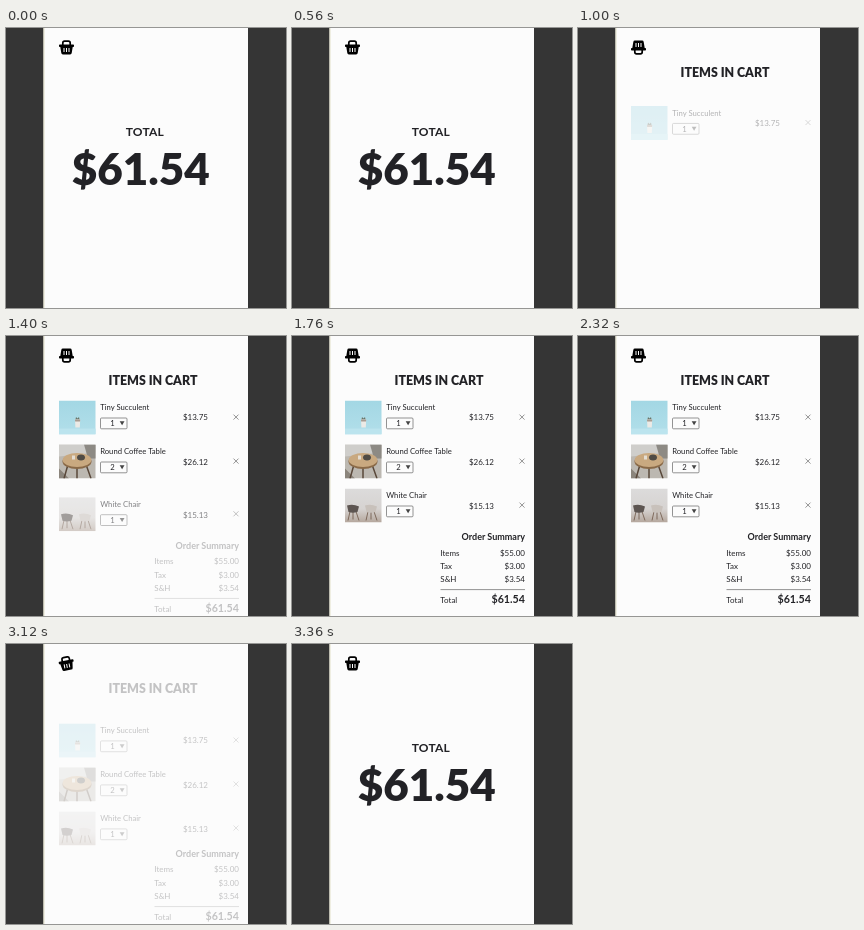
Animation, 280 px wide and 280 px high, one loop 4 s. Source, as an HTML page:

```html
<!DOCTYPE html>
<html lang="en">
<head>
<meta charset="utf-8">
<title>Cart</title>
<style>
  html, body { margin: 0; width: 100%; height: 100%; overflow: hidden; background: #353535; }
  svg { display: block; width: 280px; height: 280px; font: 8px Lato, "Open Sans", sans-serif; }
  text { fill: #222226; }
  .small { font-size: 7.7px; }
  .bold { font-weight: 700; }
  .heavy { font-weight: 900; }
  .line { fill: none; stroke: #666; stroke-width: .7; }
</style>
</head>
<body>
<svg viewBox="0 0 280 280">
  <defs>
    <clipPath id="frame"><rect width="36.5" height="34"/></clipPath>
    <linearGradient id="sky" x2="0" y2="1">
      <stop stop-color="#a3d7e4"/><stop offset="1" stop-color="#b2dfea"/>
    </linearGradient>
    <linearGradient id="wall" x2="0" y2="1">
      <stop stop-color="#dcdbdb"/><stop offset=".6" stop-color="#d6d3d1"/><stop offset="1" stop-color="#b5a79d"/>
    </linearGradient>
    <g id="plant">
      <rect width="37" height="34" fill="url(#sky)"/>
      <path d="M0 28H37V34H0Z" fill="#bce4ee"/>
      <path d="M16.500 19l.5-2.500 1.500 1.500 1.500-1.500.5 2.500z" fill="#6a7468"/>
      <path d="M16 19h5.200l-.4 8h-4.400z" fill="#eceae6"/>
      <path d="M16 19h5.200l-.1 2h-5z" fill="#a79c92"/>
    </g>
    <g id="table">
      <rect width="37" height="34" fill="#bcb8b1"/>
      <path d="M0 0H37V8L0 12Z" fill="#cfcecb"/>
      <path d="M25 0H37V14H29Z" fill="#8d8a84"/>
      <path d="M0 24L10 34H0Z" fill="#8b857c"/>
      <path d="M9 20L5 34M18 22v12M27 20l5 14" stroke="#59483a" stroke-width="1.500"/>
      <ellipse cx="18" cy="17" rx="14.500" ry="7.500" fill="#8a6a48"/>
      <ellipse cx="18" cy="15.500" rx="14.300" ry="7" fill="#c9a980"/>
      <ellipse cx="22" cy="13" rx="4" ry="3" fill="#4f4b45"/>
      <path d="M13 11h3v4h-3z" fill="#e4ddd2"/>
    </g>
    <g id="seat">
      <path d="M3 23L1 32M6 23v8M9 23l3 9" fill="none" stroke="#6b5546" stroke-width=".8"/>
      <path d="M0 17q6-2 12 1l-1.500 5.500q-5 1.500-9 0z" fill="currentColor"/>
    </g>
    <g id="chairs">
      <rect width="37" height="34" fill="url(#wall)"/>
      <use href="#seat" x="2" color="#5d5551"/><use href="#seat" x="20" color="#c8c1bb"/>
    </g>
  </defs>

  <rect width="280" height="280" fill="#353535"/>
  <rect x="37.500" width="204.500" height="280" fill="#fcfcfc"/>
  <rect x="37.500" width="1" height="280" fill="#e2dfc8"/>

  <g id="total" text-anchor="middle">
    <text x="138.800" y="108" class="bold" style="font-size:12px;letter-spacing:.2px">TOTAL</text>
    <text x="134.700" y="156.500" class="heavy" style="font-size:44px">$61.54</text>
  </g>
  <g id="title"><text x="147" y="49" class="heavy" text-anchor="middle" style="font-size:12.400px">ITEMS IN CART</text></g>
  <g id="list"></g>
  <g id="summary"></g>

  <circle id="ripple" cx="60" cy="19.500" fill="none" stroke="#000"/>
  <g id="basket">
    <path d="M56.800 18V15q0-1.800 1.800-1.800h3.800q1.800 0 1.800 1.800V18" fill="none" stroke="#000" stroke-width="1.700"/>
    <path d="M53.800 16.400H67.200q.8 0 .8.8v1q0 .8-.8.8h-.5l-1 6q-.2 1.400-1.600 1.400H56.900q-1.400 0-1.600-1.400l-1-6h-.5q-.8 0-.8-.8v-1q0-.8.8-.8z"/>
    <path d="M58 20v4M60.500 20v4M63 20v4" stroke="#fff"/>
  </g>
</svg>
<script>
const $ = id => document.getElementById(id);

const items = [
  ['plant', 'Tiny Succulent', 1, '$13.75'],
  ['table', 'Round Coffee Table', 2, '$26.12'],
  ['chairs', 'White Chair', 1, '$15.13'],
];
$('list').innerHTML = items.map(([pic, name, count, price], i) => `
  <g id="row${i}"><g transform="translate(0 ${i * 44})">
    <g transform="translate(53 64.5)" clip-path="url(#frame)"><use href="#${pic}"/></g>
    <text x="94.2" y="74.2" class="small">${name}</text>
    <rect class="line" x="94.5" y="82" width="26.5" height="10.8" rx="1"/>
    <text x="106.5" y="90.3" text-anchor="middle" class="small">${count}</text>
    <path d="M113.7 85.3h4.8l-2.4 4z" fill="#444"/>
    <text x="202" y="${84.2 + i * .4}" text-anchor="end">${price}</text>
    <path class="line" d="M227.5 78.6l5 5m0-5l-5 5"/>
  </g></g>`).join('');

const lines = [['Items', '$55.00', 219.5], ['Tax', '$3.00', 232.7], ['S&amp;H', '$3.54', 246.3]];
$('summary').innerHTML = `
  <text x="233" y="204" class="bold" text-anchor="end" style="font-size:9px">Order Summary</text>
  ${lines.map(([label, sum, y]) => `
    <text x="148.3" y="${y}">${label}</text>
    <text x="233" y="${y}" text-anchor="end">${sum}</text>`).join('')}
  <path class="line" d="M148.5 253.6H233"/>
  <text x="148.3" y="267.3">Total</text>
  <text x="233" y="267.3" class="bold" text-anchor="end" style="font-size:10.7px">$61.54</text>`;

const span = (t, start, length) => Math.min(1, Math.max(0, (t - start) / length));
const ease = (t, start, length) => {
  const x = span(t, start, length);
  return x * x * (3 - 2 * x);
};

// Fade in while rising, fade out while sinking.
function show(id, amount, drop) {
  $(id).setAttribute('opacity', amount);
  $(id).setAttribute('transform', `translate(0 ${(1 - amount) * drop})`);
}

// A disc that grows while a hole opens from its centre.
function ripple(x) {
  const outer = 18.5 * (1 - (1 - x) ** 4);
  const inner = outer * Math.min(1, 1.1 * x);
  $('ripple').setAttribute('r', (outer + inner) / 2);
  $('ripple').setAttribute('stroke-width', outer - inner);
  $('ripple').setAttribute('opacity', .23);
}

function draw(t) {
  const leave = ease(t, 2960, 240);
  show('total', 1 - ease(t, 680, 200) + ease(t, 3120, 240), 20);
  show('title', ease(t, 780, 200) - leave, 0);
  items.forEach((_, i) => show('row' + i, ease(t, 886 + 176 * i, 300) - leave, 20));
  show('summary', ease(t, 1300, 300) - leave, 12);

  const turn = 180 * (ease(t, 740, 230) + ease(t, 2900, 260));
  $('basket').setAttribute('transform', `rotate(${turn} 60.5 19.5)`);

  ripple(span(t, t < 2000 ? 570 : 2700, 200));
}

function tick() {
  draw(performance.now() % 4000);
  requestAnimationFrame(tick);
}
tick();
</script>
</body>
</html>
```
